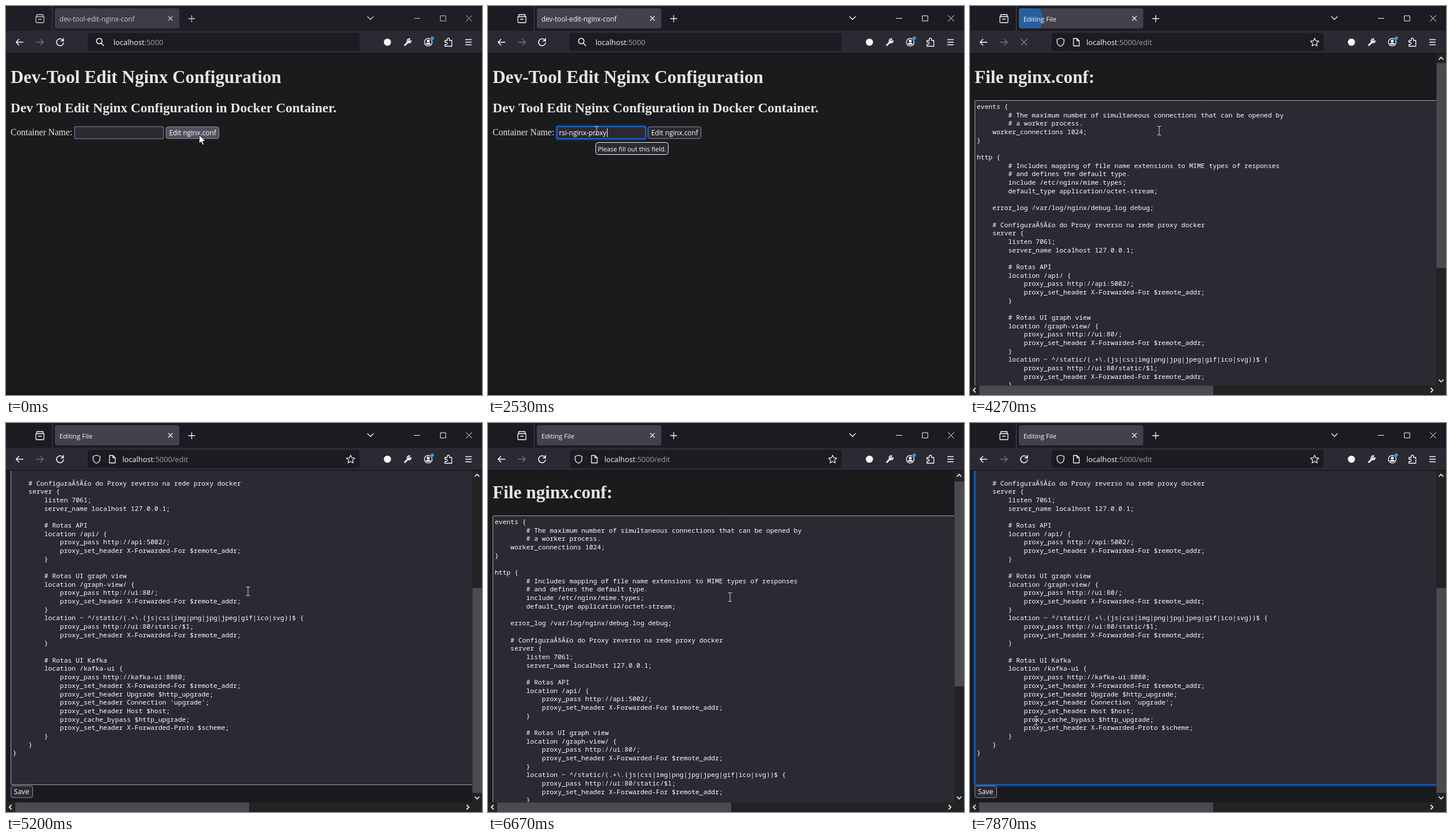
Write an HTML page with a canvas that moves like this. It is 828x677 px and loops after 8000 ms.

```html
<!DOCTYPE html>
<html lang="en">
<head>
<meta charset="utf-8">
<title>Config editor</title>
<style>
html, body { margin: 0; width: 100%; height: 100%; overflow: hidden; background: #191b1c; }
canvas { display: block; width: 828px; height: 677px; }
</style>
</head>
<body>
<canvas id="stage" width="828" height="677"></canvas>
<script>
const ctx = document.getElementById('stage').getContext('2d');
const LOOP = 8000;
const SANS = '"Open Sans", "Noto Sans", sans-serif';
const SERIF = '"Liberation Serif", serif';
const MONO = '"Noto Sans Mono", "DejaVu Sans Mono", monospace';
const PAGE = '#191b1c', PANEL = '#2b2a33', BAR = '#1c1b22', LIGHT = '#fbfbfe', BLUE = '#0a66e4', EDGE = '#8f8f9d';
const MAX_SCROLL = 276;
const LINE = 14.68;

const CONFIG = String.raw`events {
        # The maximum number of simultaneous connections that can be opened by
        # a worker process.
    worker_connections 1024;
}

http {
        # Includes mapping of file name extensions to MIME types of responses
        # and defines the default type.
        include /etc/nginx/mime.types;
        default_type application/octet-stream;

    error_log /var/log/nginx/debug.log debug;

    # ConfiguraÃ§Ã£o do Proxy reverso na rede proxy docker
    server {
        listen 7061;
        server_name localhost 127.0.0.1;

        # Rotas API
        location /api/ {
            proxy_pass http://api:5002/;
            proxy_set_header X-Forwarded-For $remote_addr;
        }

        # Rotas UI graph view
        location /graph-view/ {
            proxy_pass http://ui:80/;
            proxy_set_header X-Forwarded-For $remote_addr;
        }
        location ~ ^/static/(.+\.(js|css|img|png|jpg|jpeg|gif|ico|svg))$ {
            proxy_pass http://ui:80/static/$1;
            proxy_set_header X-Forwarded-For $remote_addr;
        }

        # Rotas UI Kafka
        location /kafka-ui {
            proxy_pass http://kafka-ui:8080;
            proxy_set_header X-Forwarded-For $remote_addr;
            proxy_set_header Upgrade $http_upgrade;
            proxy_set_header Connection 'upgrade';
            proxy_set_header Host $host;
            proxy_cache_bypass $http_upgrade;
            proxy_set_header X-Forwarded-Proto $scheme;
        }
    }
}`.split('\n');

// Pointer path: [time, x, y]
const MOUSE = [
  [0, 336, 224], [600, 336, 224], [870, 245, 248], [1330, 189, 217],
  [3070, 189, 217], [3400, 329, 217], [4470, 329, 217], [4800, 421, 293],
  [5740, 421, 293], [5800, 421, 298], [5940, 421, 298], [6000, 421, 303],
  [6900, 421, 303], [7200, 45, 650], [7400, 80, 560], [7540, 80, 560], [7870, 115, 518]
];

const clamp = v => Math.max(0, Math.min(1, v));
const ramp = (t, a, b) => clamp((t - a) / (b - a));
const smooth = v => v * v * (3 - 2 * v);
const within = (t, a, b) => t >= a && t < b;

function rect(x, y, w, h, fill) {
  ctx.fillStyle = fill;
  ctx.fillRect(x, y, w, h);
}

function box(x, y, w, h, r, fill, edge, lineWidth = 1) {
  ctx.beginPath();
  ctx.roundRect(x, y, w, h, r);
  if (fill) { ctx.fillStyle = fill; ctx.fill(); }
  if (edge) { ctx.strokeStyle = edge; ctx.lineWidth = lineWidth; ctx.stroke(); }
}

function dot(x, y, r, fill) {
  ctx.fillStyle = fill;
  ctx.beginPath();
  ctx.arc(x, y, r, 0, 7);
  ctx.fill();
}

function text(str, x, y, size, fill = LIGHT, family = SANS, weight = '') {
  ctx.font = `${weight} ${size}px ${family}`;
  ctx.fillStyle = fill;
  ctx.fillText(str, x, y);
}

// Strokes an SVG path around a centre point
function icon(x, y, d, color = LIGHT, width = 1.4) {
  ctx.save();
  ctx.translate(x, y);
  ctx.strokeStyle = color;
  ctx.lineWidth = width;
  ctx.lineCap = ctx.lineJoin = 'round';
  ctx.stroke(new Path2D(d));
  ctx.restore();
}

function fade(alpha, draw) {
  if (alpha <= 0) return;
  ctx.save();
  ctx.globalAlpha = alpha;
  draw();
  ctx.restore();
}

function mouseAt(t) {
  const i = MOUSE.findIndex(k => k[0] > t);
  if (i < 0) return MOUSE[MOUSE.length - 1].slice(1);
  const [t0, x0, y0] = MOUSE[i - 1], [t1, x1, y1] = MOUSE[i];
  const p = smooth(ramp(t, t0, t1));
  return [x0 + (x1 - x0) * p, y0 + (y1 - y0) * p];
}

function scrollAt(t) {
  if (t < 5900) return MAX_SCROLL * smooth(ramp(t, 4650, 5180));
  if (t < 6400) return MAX_SCROLL * (1 - smooth(ramp(t, 5950, 6130)));
  return MAX_SCROLL * smooth(ramp(t, 6650, 6970));
}

function drawCursor(x, y, beam) {
  if (beam) {
    icon(x, y, 'M-3 -7.5H-1L0 -6.8L1 -7.5H3M0 -6.8V6.8M-3 7.5H-1L0 6.8L1 7.5H3', '#d8d8dc', 1);
    return;
  }
  ctx.save();
  ctx.translate(x, y);
  const arrow = new Path2D('M0 0V15.5L3.6 12.2L6 18L8.6 16.9L6.2 11.3H11Z');
  ctx.fillStyle = '#fff';
  ctx.strokeStyle = '#000';
  ctx.lineWidth = 1;
  ctx.fill(arrow);
  ctx.stroke(arrow);
  ctx.restore();
}

function drawTabs(t, loaded) {
  const active = t >= 130;
  const tone = active ? LIGHT : '#c9c8ce';
  rect(0, 0, 828, 43, active ? BAR : '#1f1e25');
  rect(80, 0, 1, 43, '#45444e');
  box(85, 4, 216.5, 35, 4, active ? '#42414d' : '#3c3b46');

  const burst = ramp(t, 4235, 4600);
  if (burst > 0 && burst < 1) {
    ctx.save();
    ctx.beginPath();
    ctx.roundRect(85, 4, 216.5, 35, 4);
    ctx.clip();
    fade(0.75 * (1 - burst), () => dot(101, 22, 6 + 200 * burst, '#1d6fc4'));
    ctx.restore();
  }

  const busy = within(t, 3730, 4200);
  if (busy) dot(101 + 5 * Math.cos((t - 3730) / 130), 22, 3, loaded ? '#0a84ff' : '#a9a8b2');
  if (loaded) text('Editing File', busy ? 115 : 93, 26.5, 11.4);
  else text('dev-tool-edit-nginx-conf', busy ? 115 : 93, 26.5, 11.75, tone);

  icon(59, 22, 'M-7 -3.5H7V5.5Q7 7 5.5 7H-5.5Q-7 7 -7 5.5ZM-5.5 -3.5V-7H5.5V-3.5M-2.5 1H2.5', tone, 1.3);
  icon(286, 21.5, 'M-3.5 -3.5L3.5 3.5M3.5 -3.5L-3.5 3.5', tone, 1.2);
  icon(323, 22, 'M-5.5 0H5.5M0 -5.5V5.5', tone, 1.3);
  icon(634, 21, 'M-5 -2.5L0 2.5L5 -2.5', tone, 1.3);
  icon(715, 21.5, 'M-5 0H5', tone, 1);
  icon(760.5, 21.5, 'M-4.5 -4.5H4.5V4.5H-4.5Z', tone, 1);
  icon(805.5, 21.5, 'M-5 -5L5 5M5 -5L-5 5', tone, 1);
}

function drawToolbar(t, loaded) {
  rect(0, 43, 828, 39, PANEL);
  rect(0, 82, 828, 1, '#0e0d12');
  icon(23.5, 63, 'M6 0H-6M-1 -5L-6 0L-1 5', LIGHT, 1.5);
  icon(59, 63, 'M-6 0H6M1 -5L6 0L1 5', '#74737c', 1.4);
  if (within(t, 3670, 4500)) {
    icon(94, 63, 'M-5 -5L5 5M5 -5L-5 5', loaded ? '#85848d' : LIGHT, 1.4);
  } else {
    icon(94, 63, 'M5 -3.5A6.1 6.1 0 1 0 6.1 1M6 -6.5V-2.2H1.7', LIGHT, 1.5);
  }

  box(142, 47, 473, 31.5, 4, BAR);
  const x = loaded ? 202.5 : 187;
  text('localhost', x, 68, 12.85);
  const hostEnd = x + ctx.measureText('localhost').width;
  text(loaded ? ':5000/edit' : ':5000', hostEnd, 68, 12.85, '#a09fa8');
  if (loaded) {
    icon(157.5, 63, 'M0 -7L6 -5V-1Q6 5 0 7Q-6 5 -6 -1V-5Z', LIGHT, 1.3);
    icon(185, 63, 'M-5 -6.5H1L5 -2.5V6.5H-5ZM1 -6.5V-2.5H5', LIGHT, 1.3);
    icon(599.5, 63, 'M0 -7L2.1 -2.3L7.2 -1.8L3.4 1.6L4.5 6.6L0 4L-4.5 6.6L-3.4 1.6L-7.2 -1.8L-2.1 -2.3Z', LIGHT, 1.2);
  } else {
    icon(163.5, 62.5, 'M3.5 -1.5A4.8 4.8 0 1 1 -6.1 -1.5A4.8 4.8 0 1 1 3.5 -1.5M2.2 2.2L6.5 6.5', LIGHT, 1.5);
  }

  dot(663.5, 63, 6.2, LIGHT);
  icon(699, 63, 'M-5 5L1.5 -1.5', LIGHT, 3);
  icon(699, 63, 'M3.5 -5.8A3.6 3.6 0 1 0 5.8 -2.6L3 -1.2L1.4 -3Z', LIGHT, 1.5);
  icon(734.5, 63, 'M6.7 0A6.7 6.7 0 1 1 -6.7 0A6.7 6.7 0 1 1 6.7 0', LIGHT, 1.3);
  dot(734.5, 61, 2.5, LIGHT);
  box(730.5, 64.3, 8, 3, 1.5, LIGHT);
  dot(741.5, 56, 3.6, PANEL);
  dot(741.5, 56, 3, '#1ba1f2');
  icon(769.5, 63, 'M-6 -3H-2V-5A2 2 0 0 1 2 -5V-3H6V7H-6V4H-4A2 2 0 0 0 -4 0H-6Z', LIGHT, 1.3);
  icon(804.5, 63, 'M-5 -4.5H5M-5 0H5M-5 4.5H5', LIGHT, 1.3);
}

function button(label, x, y, w, fill, size) {
  box(x + .5, y + .5, w - 1, 20.5, 3.5, fill, EDGE);
  text(label, x + 5.7, y + 15.3, size);
}

function focusRing(x, y, w, h) {
  box(x - 1.5, y - 1.5, w + 3, h + 3, 4, null, 'rgba(0,96,223,.3)', 4);
  box(x, y, w, h, 2, null, BLUE, 2);
}

function caretOn(t) {
  return within(t, 200, 700) || within(t, 1200, 1700) || within(t, 2200, 2870) || within(t, 3370, 3670);
}

function drawForm(t, mx, my) {
  text('Dev-Tool Edit Nginx Configuration', 8, 133.5, 31.3, '#e8e6e3', SERIF, 'bold');
  text('Dev Tool Edit Nginx Configuration in Docker Container.', 8, 184.5, 23.47, '#e8e6e3', SERIF, 'bold');
  text('Container Name:', 8, 225.3, 15.65, '#e8e6e3', SERIF);

  box(119.5, 210, 154.5, 21, 1, PANEL, EDGE);
  if (within(t, 200, 3670)) focusRing(120, 210, 154, 21);
  const filled = t >= 2520;
  if (filled) text('rsi-nginx-proxy', 123.5, 225.3, 11.9);
  if (caretOn(t)) rect(filled ? 207 : 123, 213, 1, 15, LIGHT);

  const over = mx >= 278 && mx < 371 && my >= 210 && my < 231;
  const pressed = within(t, 130, 200) || within(t, 3670, 3740);
  button('Edit nginx.conf', 278, 209.7, 93, pressed ? '#5b5b66' : over ? '#52525e' : PANEL, 11.9);

  fade(ramp(t, 160, 330) * (1 - ramp(t, 1440, 1730)), () => {
    box(119, 231.5, 161.5, 52, 6, '#42414d', '#5b5a66');
    text('Please fill out this field.', 141, 260.5, 11.08);
  });
  fade(ramp(t, 2140, 2330) * (1 - ramp(t, 3040, 3140)), () => {
    box(187.5, 237.5, 126, 21, 4, PANEL, '#f0f0f4');
    text('Please fill out this field.', 191, 252.8, 11.12);
  });
  rect(0, 672.5, 828, 4.5, '#171215');
}

function drawScrollbars(scroll) {
  rect(811, 83, 17, 577, '#212325');
  rect(0, 660, 828, 17, '#212325');
  rect(811.5, 99.5 + scroll * 0.68, 16.5, 356.5, '#494c4f');
  rect(16, 660.5, 407, 16.5, '#494c4f');
  icon(819.5, 91, 'M-3.5 1.8L0 -1.8L3.5 1.8', '#e4e2df', 1.8);
  icon(819.5, 652.5, 'M-3.5 -1.8L0 1.8L3.5 -1.8', '#e4e2df', 1.8);
  icon(7.5, 668.5, 'M1.8 -3.5L-1.8 0L1.8 3.5', '#e4e2df', 1.8);
  icon(803.5, 668.5, 'M-1.8 -3.5L1.8 0L-1.8 3.5', '#e4e2df', 1.8);
}

function drawEditor(t, scroll, mx, my) {
  ctx.save();
  ctx.beginPath();
  ctx.rect(0, 83, 811, 577);
  ctx.clip();
  ctx.translate(0, -Math.round(scroll));
  text('File nginx.conf:', 8, 133.5, 31.3, '#e8e6e3', SERIF, 'bold');
  box(8.5, 164.5, 1600, 741, 1, PANEL, '#a5a4b0');
  if (t >= 7670) focusRing(8.5, 164.5, 1600, 741);
  CONFIG.forEach((line, i) => text(line, 11.7, 179 + LINE * i, 11.41, LIGHT, MONO));
  const over = mx >= 8 && mx < 47 && my + scroll >= 907 && my + scroll < 929;
  button('Save', 8, 907, 39, over ? '#52525e' : PANEL, 12.3);
  ctx.restore();
  drawScrollbars(scroll);
}

function render(t) {
  const loaded = t >= 4130;
  const [mx, my] = mouseAt(t);
  const scroll = scrollAt(t);
  rect(0, 0, 828, 677, PAGE);
  drawTabs(t, loaded);
  drawToolbar(t, loaded);
  let beam;
  if (loaded) {
    drawEditor(t, scroll, mx, my);
    beam = my + scroll > 164 && my + scroll < 905;
  } else {
    drawForm(t, mx, my);
    beam = mx > 119 && mx < 275 && my > 209 && my < 232;
  }
  drawCursor(mx, my, beam);
}

function tick(now) {
  render(now % LOOP);
  requestAnimationFrame(tick);
}
requestAnimationFrame(tick);
</script>
</body>
</html>
```
